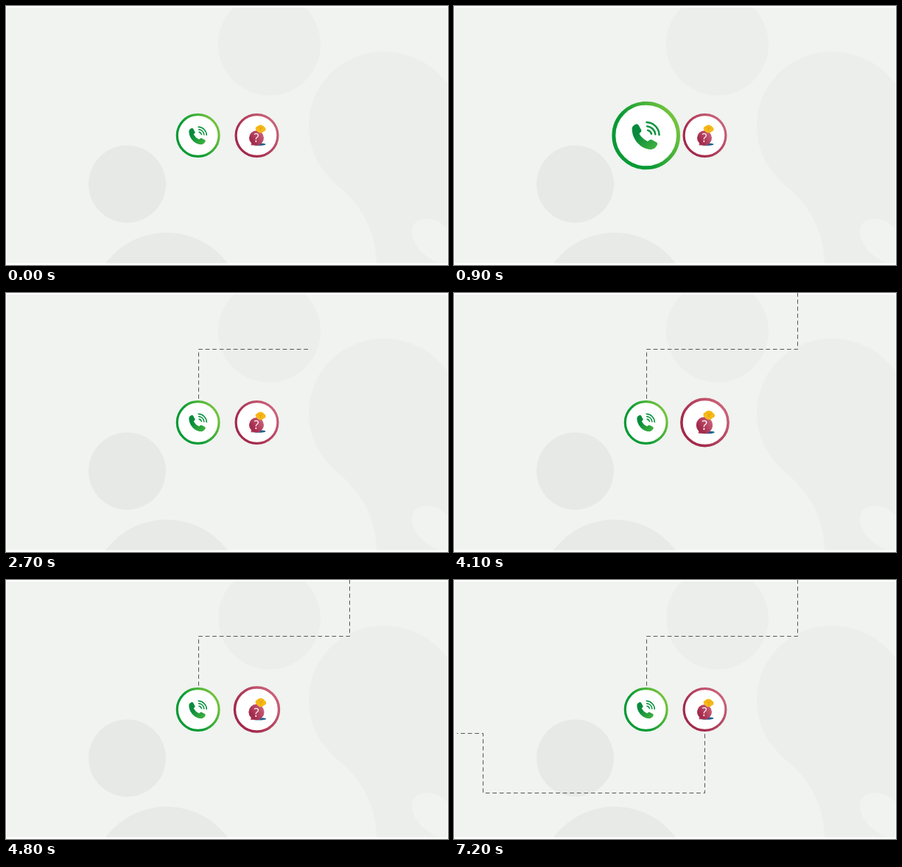
Write an HTML page that moves like this. It is 600x352 px and loops after 9000 ms.

```html
<!DOCTYPE html>
<html lang="en">
<head>
<meta charset="utf-8">
<title>Contact icons</title>
<style>
html, body { margin: 0; width: 100%; height: 100%; overflow: hidden; background: #fff; }
svg { display: block; width: 600px; height: 352px; }
.line { fill: none; stroke: #555; stroke-dasharray: 5.7 3.845; stroke-dashoffset: -2.3; }
.reveal { fill: none; stroke: #fff; stroke-width: 4; stroke-dasharray: 0 999; }
.ring { fill: #fefffe; stroke-width: 3.2; }
.wave { fill: none; stroke: #0d9340; stroke-width: 1.6; stroke-linecap: round; }
.mark { font: 16px "Open Sans", "Noto Sans", sans-serif; fill: #fff; text-anchor: middle; }
</style>
</head>
<body>
<svg viewBox="0 0 600 352">
  <defs>
    <clipPath id="panel"><rect x="1" y="2" width="598" height="347.5"/></clipPath>
    <linearGradient id="green" x1="0" y1=".7" x2="1" y2=".15">
      <stop offset=".3" stop-color="#069a34"/><stop offset="1" stop-color="#84c93f"/>
    </linearGradient>
    <linearGradient id="phone" x1="0" y1="0" x2="1" y2="1">
      <stop offset=".3" stop-color="#078a3c"/><stop offset="1" stop-color="#45b53f"/>
    </linearGradient>
    <linearGradient id="red" x1="0" y1=".8" x2="1" y2=".1">
      <stop offset=".2" stop-color="#a32a4c"/><stop offset="1" stop-color="#d0697f"/>
    </linearGradient>
    <mask id="maskA" maskUnits="userSpaceOnUse" x="0" y="0" width="600" height="352">
      <path class="reveal" id="revealA" d="M261.5 146V76.5H466.5V0"/>
    </mask>
    <mask id="maskB" maskUnits="userSpaceOnUse" x="0" y="0" width="600" height="352">
      <path class="reveal" id="revealB" d="M340.5 207V289.5H39.5V208.5H4"/>
    </mask>
  </defs>

  <g clip-path="url(#panel)">
    <rect width="600" height="352" fill="#f0f3f0"/>
    <circle cx="357.5" cy="52" r="69.5" fill="#ebeeeb"/>
    <path fill="#ebeeeb" d="M411 163A101 101 0 0 1 512 62C548 62 580 79 600 107V352H503C503 312 487 277 456 249C428 226 411 199 411 163Z"/>
    <path fill="#f0f3f0" d="M551 307C551 294 561 289 574 289Q588 290 600 303V352H592C569 342 551 326 551 307Z"/>
    <circle cx="164.5" cy="242" r="52.5" fill="#e6e9e6"/>
    <circle cx="218" cy="411" r="103" fill="#e7eae7"/>
  </g>

  <g mask="url(#maskA)"><path class="line" d="M261.5 146V76.5H466.5V0"/></g>
  <g mask="url(#maskB)"><path class="line" d="M340.5 207V289.5H39.5V208.5H4"/></g>

  <g id="call">
    <circle class="ring" r="28.4" stroke="url(#green)"/>
    <path fill="url(#phone)" d="M-12.3-6.5Q-11.7-9-8.7-10Q-7.2-10.3-6.5-9L-4.2-4.8Q-3.8-3.6-4.8-2.8L-6-1.6Q-3.5 3 1.4 5.2L3 4Q4 3.3 5 3.8L9.2 6Q10.5 6.8 9.8 8.3Q8 12 4.5 12.3C-4.5 12.3-12.8 3.5-12.3-6.5Z"/>
    <path class="wave" d="M.5-11.6A11.5 11.5 0 0 1 11.6-.6M1-8.1A8 8 0 0 1 8.2-1M1.5-4.6A4.5 4.5 0 0 1 4.8-1.4"/>
  </g>

  <g id="help">
    <circle class="ring" r="28.4" stroke="url(#red)"/>
    <ellipse cx="2.5" cy="12" rx="9.5" ry="1.7" fill="#25608f"/>
    <path fill="#b03c58" d="M-8 13.2L-7 8H6L4 13.2Z"/>
    <circle cx="-.5" cy="3.2" r="10" fill="url(#red)"/>
    <g fill="#f6b917">
      <ellipse cx="5" cy="-9" rx="5.6" ry="5.6"/>
      <circle cx="1" cy="-9.5" r="2.8"/>
      <circle cx="9.2" cy="-8.6" r="2.8"/>
    </g>
    <path d="M2.5-11.5L5-9.5L8-11M5-9.5V-6" fill="none" stroke="#dc9312" stroke-width=".8"/>
    <text class="mark" x="-.5" y="9">?</text>
  </g>
</svg>
<script>
const LOOP = 9000, STEP = 100;
const $ = id => document.getElementById(id);
const progress = (t, start, end) => Math.min(1, Math.max(0, (t - start) / (end - start)));

function pulse(id, x, y, p, gain) {
  const scale = 1 + gain * (1 - Math.cos(2 * Math.PI * p)) / 2;
  $(id).setAttribute("transform", `translate(${x} ${y}) scale(${scale})`);
}

function reveal(id, p) {
  const path = $(id);
  path.style.strokeDasharray = `${p * path.getTotalLength()} 999`;
}

function draw() {
  const t = Math.floor(performance.now() % LOOP / STEP) * STEP;
  pulse("call", 260.7, 176, progress(t, 300, 1400), .555);
  pulse("help", 340.5, 176, progress(t, 3966, 4893), .59);
  reveal("revealA", progress(t, 1500, 3400));
  reveal("revealB", progress(t, 5100, 7000));
  requestAnimationFrame(draw);
}
draw();
</script>
</body>
</html>
```
